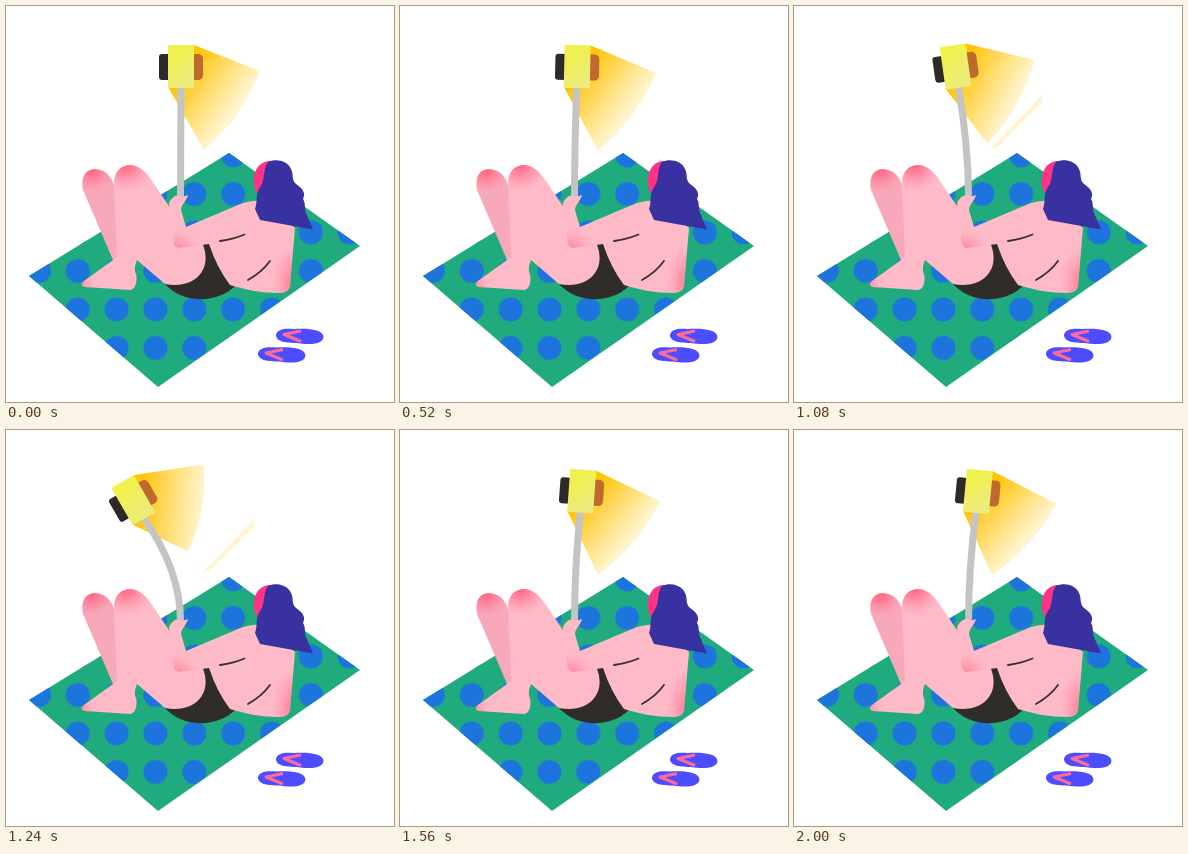
An HTML page for the animation above (2.04 s loop, 388x396 px).

```html
<!DOCTYPE html>
<html lang="en">
<head>
<meta charset="utf-8">
<title>Sunbathing selfie</title>
<style>
  html, body { margin: 0; width: 100%; height: 100%; overflow: hidden; background: #fff; }
  svg { display: block; width: 388px; height: 396px; }
</style>
</head>
<body>
<svg viewBox="0 0 388 396">
  <defs>
    <pattern id="dots" x="13.500" y="168.800" width="38.850" height="38.500" patternUnits="userSpaceOnUse">
      <circle cx="19.400" cy="19.200" r="12" fill="#1c74dc"/>
    </pattern>
    <radialGradient id="blush">
      <stop offset="0" stop-color="#ff5f7c"/>
      <stop offset=".4" stop-color="#ff6f8a" stop-opacity=".65"/>
      <stop offset="1" stop-color="#ff8fa5" stop-opacity="0"/>
    </radialGradient>
    <linearGradient id="glow" gradientUnits="userSpaceOnUse" x1="0" y1="0" x2="57" y2="41">
      <stop offset=".1" stop-color="#ffc50a"/>
      <stop offset=".4" stop-color="#ffc81a" stop-opacity=".77"/>
      <stop offset="1" stop-color="#ffd02c" stop-opacity=".22"/>
    </linearGradient>
    <linearGradient id="case" x1="0" y1="0" x2=".4" y2="1">
      <stop offset=".3" stop-color="#f0f04f"/>
      <stop offset="1" stop-color="#ecec7c"/>
    </linearGradient>
    <path id="backLeg" d="M77 184C74 168 82 162 92 163.500C99 165 103 168 107 176L128 250L107 254Z"/>
    <path id="frontLeg" d="M108 178C108 165 115 159 125 159C134 160 140 166 146 175L171 212L196 236C201 248 201 259 195 267C188 277 174 281 159 278L131 254Q127 263 130.500 270Q131 283 124 284L79 281Q73 279 78 275L107 254L111 250Z"/>
    <path id="torso" d="M203 238L172 242C167 240 167 234 167 230L163 199C163 194 168 189 174 189L176 191L182 189C181 194 175 199 175 204L180 221L232 199Q245 194 255 195L289 222L284 280Q283 287 273 287C256 287 240 284 224 279Q211 262 203 238Z"/>
    <clipPath id="inBack"><use href="#backLeg"/></clipPath>
    <clipPath id="inFront"><use href="#frontLeg"/></clipPath>
    <clipPath id="inTorso"><use href="#torso"/></clipPath>
    <g id="flipflop">
      <path fill="#4d4cff" d="M270 329C271 323 279 322 288 323C301 322 317 323 317.500 331C317 339 302 339 291 337C281 337 270 336 270 329Z"/>
      <path d="M295 325L278 328.500L295 335.500" fill="none" stroke="#ff6b97" stroke-width="3" stroke-linejoin="round"/>
    </g>
  </defs>

  <path d="M23 270L223 147L354 240L152 381Z" fill="#1fab7e"/>
  <path d="M23 270L223 147L354 240L178 362H130Z" fill="url(#dots)"/>

  <path id="cone" fill="url(#glow)"/>
  <path id="streak" d="M196 143L249 88L247 98L203 141Z" fill="#ffd02c" opacity=".22"/>
  <path id="stick" fill="none" stroke="#c4c4c4" stroke-width="7"/>
  <g id="camera">
    <path d="M-12 -12H-19Q-22 -12 -22 -9V11Q-22 14 -19 14H-12Z" fill="#2f2a29"/>
    <path d="M12 -12H18Q22 -11 22 -7V9Q22 13 18 14H12Z" fill="#bf692f"/>
    <rect x="-13" y="-21" width="26" height="43" fill="url(#case)"/>
  </g>

  <use href="#backLeg" fill="#f7a9bb"/>
  <circle cx="86" cy="163" r="25" fill="url(#blush)" clip-path="url(#inBack)"/>
  <path d="M194 237H203L229 280C211 298 176 298 158 277L190 255Z" fill="#302c2a"/>
  <use href="#frontLeg" fill="#ffbac8"/>
  <g clip-path="url(#inFront)" fill="url(#blush)">
    <ellipse cx="120" cy="158" rx="28" ry="28"/>
    <circle cx="75" cy="280" r="15" opacity=".5"/>
  </g>
  <use href="#torso" fill="#ffbac8"/>
  <g clip-path="url(#inTorso)" fill="url(#blush)">
    <ellipse cx="170" cy="247" rx="26" ry="24" opacity=".7"/>
    <ellipse cx="288" cy="279" rx="22" ry="42" opacity=".75"/>
  </g>
  <path d="M214 235Q228 233 238.500 228.500M242 274Q256 266 264 255" fill="none" stroke="#363034" stroke-width="1.800" stroke-linecap="round"/>

  <path d="M264 155C250 155 244 172 250 186L268 180Z" fill="#ff3486"/>
  <path d="M262 156C270 152 282 155 285 163C288 169 285 173 290 178C297 183 300 187 297 193C300 198 298 202 300 207L307 223.500L254 214L249 203C252 195 249 188 254 181C260 174 256 164 262 156Z" fill="#3a31a0"/>

  <use href="#flipflop"/>
  <use href="#flipflop" x="-18" y="18.500"/>
</svg>
<script>
  const el = id => document.getElementById(id);
  const set = (id, name, value) => el(id).setAttribute(name, value);
  const rad = Math.PI / 180;

  function draw(ms) {
    // The pole sways at constant speed between its two extremes.
    const lean = -25.2 * Math.asin(Math.sin(ms / 1020 * 2 * Math.PI)) / (Math.PI / 2);
    const tilt = lean * 1.38;
    const reach = 130 - .15 * lean - .008 * lean * lean;
    const cx = 175 + reach * Math.sin(lean * rad);
    const cy = 190 - reach * Math.cos(lean * rad);
    const cos = Math.cos(tilt * rad), sin = Math.sin(tilt * rad);
    const place = (x, y) => [cx + x * cos - y * sin, cy + x * sin + y * cos];

    const pose = `translate(${cx} ${cy}) rotate(${tilt})`;
    set('camera', 'transform', pose);
    set('glow', 'gradientTransform', pose);
    set('stick', 'd', `M174.500 191Q174.500 140 ${place(0, 20)}`);

    // The lower tip of the light lags behind the camera.
    const far = place(79, 5);
    const tip = lean > 0 ? [198, 144 + .26 * lean] : [198 + .75 * lean, 144 + 1.05 * lean];
    const dx = tip[0] - far[0], dy = tip[1] - far[1], len = Math.hypot(dx, dy);
    const bulge = [(far[0] + tip[0]) / 2 + 12 * dy / len, (far[1] + tip[1]) / 2 - 12 * dx / len];
    set('cone', 'd', `M${place(13, -21)}L${far}Q${bulge} ${tip}L${place(-13, 21)}Z`);
    set('streak', 'visibility', lean < -.1 ? 'visible' : 'hidden');
  }

  const start = performance.now();
  function tick() {
    const ms = (performance.now() - start) % 2040;
    draw(Math.floor(ms / 40) * 40);
    requestAnimationFrame(tick);
  }
  tick();
</script>
</body>
</html>
```
